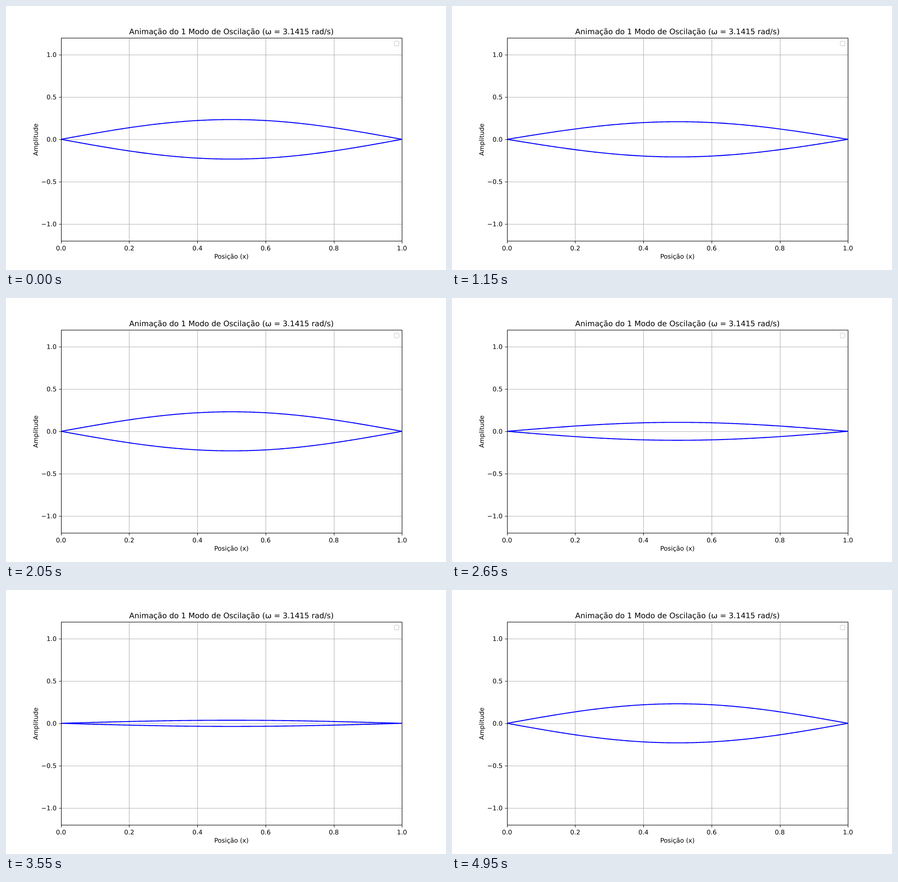
Write an HTML page that moves like this. It is 966x580 px and loops after 5 s.

```html
<!DOCTYPE html>
<html lang="pt">
<head>
<meta charset="utf-8">
<title>Modo de Oscilação</title>
<style>
  html, body { margin: 0; width: 100%; height: 100%; overflow: hidden; background: #fff; }
  svg { display: block; width: 966px; height: 580px; }
  text {
    font-family: "DejaVu Sans", sans-serif;
    font-size: 13.889px;
    text-anchor: middle;
    text-rendering: geometricPrecision;
  }
  .title { font-size: 16.667px; }
  .end { text-anchor: end; }
  path, rect { fill: none; stroke-width: 1.111; }
  #grid { stroke: #b0b0b0; }
  #ticks, .frame { stroke: #000; }
  .legend { stroke: #ccc; stroke-opacity: .8; stroke-width: 1.389; }
  .wave { stroke: #00f; stroke-width: 2.083; stroke-linejoin: round; stroke-linecap: square; }
</style>
</head>
<body>
<svg viewBox="0 0 966 580">
  <clipPath id="plot"><rect x="121" y="70" width="748" height="446"/></clipPath>
  <path id="grid"/>
  <path id="ticks"/>
  <g clip-path="url(#plot)">
    <path class="wave"/>
    <path class="wave"/>
  </g>
  <rect class="frame" x="121.5" y="70.5" width="748" height="446"/>
  <rect class="legend" x="852.5" y="77.5" width="10" height="10" rx="2.6"/>
  <g id="labels"></g>
  <text class="title" x="495" y="61.5">Animação do 1 Modo de Oscilação (ω = 3.1415 rad/s)</text>
  <text x="495" y="555">Posição (x)</text>
  <text transform="translate(69.5 293.5) rotate(-90)">Amplitude</text>
</svg>
<script>
  const LEFT = 120.75, WIDTH = 748.65, MID = 292.9, UNIT = 186.083;
  const PEAK = 0.2333, STEP = 50, LOOP = 5000, POINTS = 200;
  const px = x => LEFT + WIDTH * x;
  const py = y => MID - UNIT * y;
  const snap = v => Math.floor(v + 0.5) + 0.5;
  const $ = id => document.getElementById(id);

  function label(str, x, y, cls) {
    const t = document.createElementNS('http://www.w3.org/2000/svg', 'text');
    t.textContent = str;
    t.setAttribute('x', x);
    t.setAttribute('y', y);
    if (cls) t.setAttribute('class', cls);
    $('labels').append(t);
  }

  function drawAxes() {
    let grid = '', ticks = '';
    for (let i = 0; i <= 5; i++) {
      const x = snap(px(i / 5));
      grid += `M${x} 70V516`;
      ticks += `M${x} 516.5v5`;
      label((i / 5).toFixed(1), px(i / 5), 537);
    }
    for (let i = -2; i <= 2; i++) {
      const y = snap(py(i / 2));
      grid += `M121 ${y}H869`;
      ticks += `M121.5 ${y}h-5`;
      label((i / 2).toFixed(1).replace('-', '−'), 111, Math.round(py(i / 2) + 5.07), 'end');
    }
    $('grid').setAttribute('d', grid);
    $('ticks').setAttribute('d', ticks);
  }

  function wavePath(amp) {
    let d = '';
    for (let i = 0; i <= POINTS; i++) {
      const x = i / POINTS;
      d += (i ? 'L' : 'M') + px(x).toFixed(2) + ' ' + py(amp * Math.sin(Math.PI * x)).toFixed(3);
    }
    return d;
  }

  const [upper, lower] = document.querySelectorAll('.wave');

  function draw(ms) {
    const t = Math.floor((ms % LOOP) / STEP) * STEP / 1000;
    const amp = PEAK * Math.cos(Math.PI * t);
    upper.setAttribute('d', wavePath(amp));
    lower.setAttribute('d', wavePath(-amp));
  }

  drawAxes();
  draw(0);
  const start = performance.now();
  (function tick() {
    draw(Math.max(0, performance.now() - start));
    requestAnimationFrame(tick);
  })();
</script>
</body>
</html>
```
